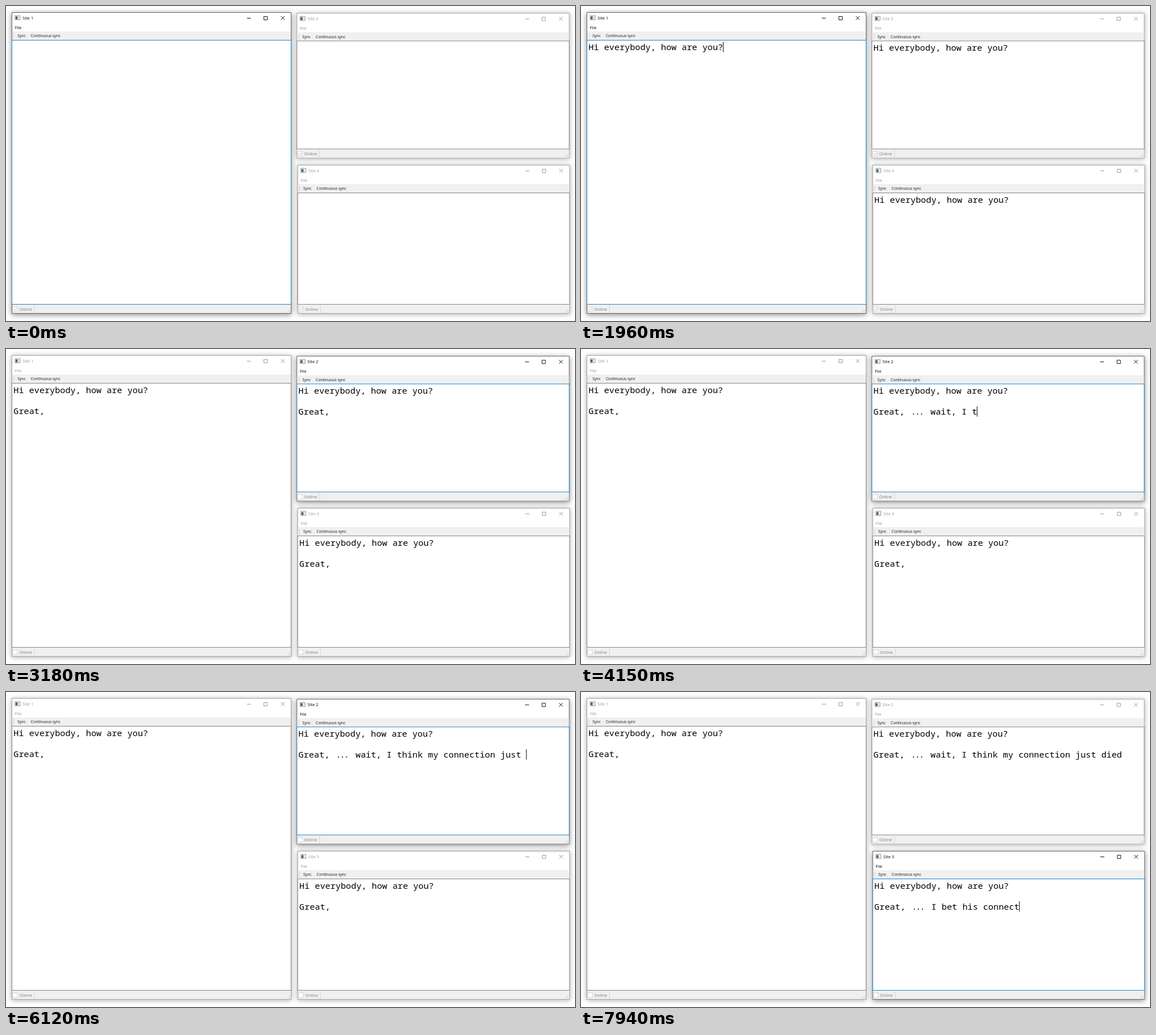
Animation of 1005x557 px, one loop 8 s. Source, as an HTML page:

```html
<!DOCTYPE html>
<html lang="en">
<head>
<meta charset="utf-8">
<title>Three synced editors</title>
<style>
  html, body { margin: 0; height: 100%; overflow: hidden; background: #fefefe; }
  svg { display: block; }
  text { font: 7.4px "Open Sans", "Noto Sans", sans-serif; white-space: pre; }
  .frame { fill: #fff; stroke: #a6a6a6; filter: drop-shadow(0 1px 4px #0005); }
  .active .frame { stroke: #686868; filter: drop-shadow(0 2px 5px #0007); }
  .bar { fill: #f0f0f0; }
  .tool { font-size: 6.8px; fill: #111; }
  .status { fill: #7c7c7c; }
  .title { fill: #999; }
  .buttons { fill: none; stroke: #999; }
  .active .title { fill: #000; }
  .active .buttons { stroke: #111; }
  .editor { fill: #fff; stroke: #858585; }
  .active .editor { stroke: #1f83cc; }
  .line { font: 15.24px "Noto Sans Mono", "DejaVu Sans Mono", monospace; fill: #000; }
  .box { fill: #fff; stroke: #ccc; stroke-width: .8; }
  .check { fill: none; stroke: #b4b4b4; }
</style>
</head>
<body>
<svg id="stage" width="1005" height="557" viewBox="0 0 1005 557"></svg>
<script>
const LOOP = 8000;
const ADVANCE = 15.24 * 0.6, LINE = 18.3, TEXT_X = 3.3, TEXT_Y = 67;
const GREETING = 'Hi everybody, how are you?';
const REPLY = 'Great, ... wait, I think my connection just died';
const GUESS = 'Great, ... I bet his connect';

// [time, characters typed]
const greetingKeys = [[100, 1], [900, 12], [930, 13], [1190, 13], [1680, 21], [1780, 22], [1930, 26]];
const replyKeys = [[2590, 1], [3040, 6], [3210, 6], [3300, 8], [3400, 9], [4150, 20], [4250, 21],
  [4970, 31], [5070, 32], [5270, 33], [5820, 39], [5920, 40], [6300, 48]];
const guessKeys = [[6690, 7], [6740, 8], [7490, 22], [7590, 23], [7940, 28]];
const caretOff = [[0, 100], [990, 1200], [3090, 3210]];
const SITE2_FOCUS = 2220, SITE2_NEWLINE = 2420, OFFLINE = 3120;
const SITE3_FOCUS = 6400, SITE3_CLICK = 6690;

const grip = (x, y) => [[0, 0], [-2, 0], [-4, 0], [0, -2], [-2, -2], [0, -4]]
  .map(([dx, dy]) => `<rect x="${x + dx}" y="${y + dy}" width="1" height="1" fill="#bbb"/>`).join('');

function windowMarkup({ x, y, w, h }, i) {
  const s = h - 16.5;
  return `<g class="window" transform="translate(${x} ${y})">
    <rect class="frame" x=".5" y=".5" width="${w - 1}" height="${h - 1}"/>
    <rect x="6" y="6" width="9" height="7.5" fill="#e4e9ea" stroke="#8b9294" stroke-width=".8"/>
    <rect x="7" y="7.5" width="3.5" height="5" fill="#45655f"/>
    <text class="title" x="19.3" y="12.8">Site ${i + 1}</text>
    <path class="buttons" d="M${w - 78.5} 10.5h7 M${w - 48.5} 7.5h6v6h-6z M${w - 18.5} 7l6.5 6.5m0-6.5l-6.5 6.5"/>
    <text class="title" x="5.7" y="29.8">File</text>
    <rect class="bar" x="1" y="34" width="${w - 2}" height="15"/>
    <path d="M3.7 38v9" stroke="#b0b0b0" stroke-dasharray="1 1.5"/>
    <text class="tool" x="10.2" y="44.3">Sync</text>
    <text class="tool" x="33.8" y="44.3">Continuous sync</text>
    <rect class="bar" x="1" y="${s}" width="${w - 2}" height="15.5"/>
    <rect class="editor" x=".5" y="49.5" width="${w - 1}" height="${s - 49.5}"/>
    <rect class="box" x="2" y="${s + 4.5}" width="8" height="8"/>
    <path class="check" d="M3.5 ${s + 8.5}l2 2 3.5-4"/>
    <text class="status" x="13.4" y="${s + 11.3}">Online</text>
    <path d="M40.5 ${s + 2}v13" stroke="#d6d6d6"/>
    ${grip(w - 3.5, h - 3.5)}
    <text class="line" x="${TEXT_X}" y="${TEXT_Y}"></text>
    <text class="line" x="${TEXT_X}" y="${TEXT_Y + 2 * LINE}"></text>
    <rect class="caret" width="1" height="18.3"/>
  </g>`;
}

const stage = document.getElementById('stage');
stage.innerHTML = [
  { x: 10, y: 11, w: 494, h: 533 },
  { x: 513.3, y: 12.3, w: 482, h: 257 },
  { x: 514.8, y: 281, w: 481, h: 263 }
].map(windowMarkup).join('');

const sites = [...stage.querySelectorAll('.window')].map(node => ({
  node,
  lines: node.querySelectorAll('.line'),
  caret: node.querySelector('.caret'),
  check: node.querySelector('.check')
}));

function typed(keys, t) {
  let count = 0;
  keys.forEach(([at, from], i) => {
    if (t < at) return;
    const [end, to] = keys[i + 1] || [at + 1, from];
    count = from + (to - from) * Math.min(1, (t - at) / (end - at));
  });
  return Math.floor(count + 1e-6);
}

function setLine(node, text) {
  node.textContent = text;
  // three dots in a row sit closer together
  if (text.includes('...')) node.setAttribute('dx', '0 0 0 0 0 0 0 2 -2 -2 2');
  else node.removeAttribute('dx');
}

function draw(t) {
  const greeted = typed(greetingKeys, t);
  const replied = typed(replyKeys, t);
  const guessed = typed(guessKeys, t);
  const shared = REPLY.slice(0, Math.min(replied, 6));
  const second = [shared, REPLY.slice(0, replied), guessed ? GUESS.slice(0, guessed) : shared];
  const carets = [
    [greeted, 0],
    t < SITE2_NEWLINE ? [26, 0] : [replied, 2],
    t < SITE3_CLICK ? [0, 0] : [guessed, 2]
  ];
  const active = t < SITE2_FOCUS ? 0 : t < SITE3_FOCUS ? 1 : 2;
  const blinkOn = !caretOff.some(([from, to]) => t >= from && t < to);

  sites.forEach(({ node, lines, caret, check }, i) => {
    node.classList.toggle('active', i === active);
    setLine(lines[0], GREETING.slice(0, greeted));
    setLine(lines[1], second[i]);
    const [column, row] = carets[i];
    caret.setAttribute('x', TEXT_X + column * ADVANCE - 0.3);
    caret.setAttribute('y', 52.4 + row * LINE);
    caret.style.display = i === active && blinkOn ? '' : 'none';
    check.style.display = t < OFFLINE ? '' : 'none';
  });
}

const start = performance.now();
function tick() {
  draw((performance.now() - start) % LOOP);
  requestAnimationFrame(tick);
}
tick();
</script>
</body>
</html>
```
